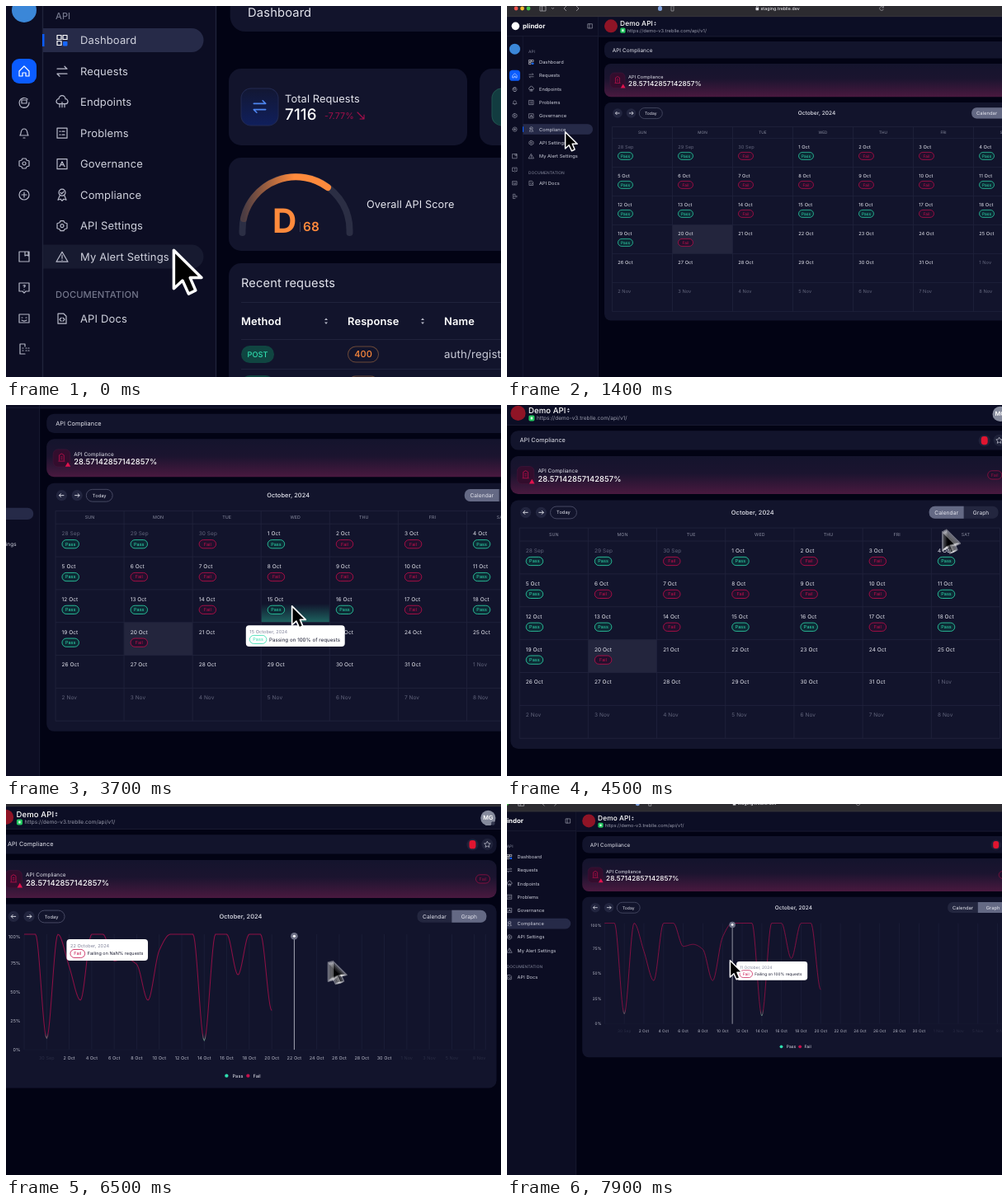
Recreate the animation shown at these times as an HTML page. Size 600 by 450 pixels, loop 8000 ms.

```html
<!DOCTYPE html>
<html lang="en">
<head>
<meta charset="utf-8">
<title>API compliance walkthrough</title>
<style>
  html, body { margin: 0; width: 100%; height: 100%; overflow: hidden; background: #020314; }
  svg { display: block; width: 600px; height: 450px; }
  text { font-family: Inter, Roboto, sans-serif; letter-spacing: .01em; white-space: pre; text-rendering: geometricPrecision; }
</style>
</head>
<body>
<svg id="stage" viewBox="0 0 600 450" xmlns="http://www.w3.org/2000/svg"></svg>
<script>
const LOOP = 8000, STEP = 100, LEAD = 110;
const PAGE_SWITCH = 900, GRAPH_OPEN = 4950, TOGGLE = 5150, CHART_HOVER = 6400;
const RED = '#c60f4c', TEAL = '#2fdcae', PANEL = '#12142c', LINE = '#20233c', TEXT = '#e4e5ee', DIM = '#62657c';
const clamp = (v, a = 0, b = 1) => Math.min(b, Math.max(a, v));
const range = n => [...Array(n).keys()];

// Monotone cubic through rows of [position, ...values]
function spline(rows) {
  const slope = (i, c) => (rows[i + 1][c] - rows[i][c]) / (rows[i + 1][0] - rows[i][0]);
  const tangent = (i, c) => {
    if (i === 0 || i === rows.length - 1) return 0;
    const a = slope(i - 1, c), b = slope(i, c);
    return a * b <= 0 ? 0 : 2 * a * b / (a + b);
  };
  return x => {
    let i = 0;
    while (i < rows.length - 2 && x >= rows[i + 1][0]) i++;
    const h = rows[i + 1][0] - rows[i][0], u = clamp((x - rows[i][0]) / h);
    return rows[i].slice(1).map((v, k) => {
      const c = k + 1, w = u * u * (3 - 2 * u);
      return v * (1 - w) + rows[i + 1][c] * w
        + h * u * (1 - u) * ((1 - u) * tangent(i, c) - u * tangent(i + 1, c));
    });
  };
}

// time, scale, x, y
const camera = spline([
  [0, 2.3, .3, -115], [300, 2.3, .3, -115], [900, 1.45, .1, -40], [1400, 1, 0, 0],
  [1600, .985, 0, 1], [2400, 1.122, -78.6, -35.1], [2700, 1.138, -85.1, -38.3],
  [3900, 1.138, -85.1, -38.3], [4750, 1.14, -142, -12.4], [5100, 1.14, -142, -12.4],
  [5350, 1.14, -143.6, -11.8], [7200, 1.14, -143.6, -11.8], [7900, .995, -26.2, -3.7], [8300, .963, 0, -1.9]
]);
// time, x, y
const pointer = spline([
  [0, 87.7, 178], [250, 87.7, 178], [700, 70, 152], [1700, 70, 152], [2400, 241, 215],
  [2600, 308, 213], [3050, 308, 213], [3500, 378.8, 247.2], [3900, 378.8, 247.2],
  [4700, 618.4, 129.3], [6200, 618.4, 129.3], [6500, 468, 178], [6800, 375, 194],
  [7200, 315, 195.5], [7900, 297.5, 193.7], [8300, 297.5, 193.7]
]);

// Markup helpers
const attrs = o => Object.entries(o).map(([k, v]) => `${k}="${v}"`).join(' ');
const text = (x, y, size, str, o = {}) =>
  `<text ${attrs({ x, y: y + size * .36, 'font-size': size, fill: TEXT, ...o })}>${str}</text>`;
const mid = (x, y, size, str, o = {}) => text(x, y, size, str, { 'text-anchor': 'middle', ...o });
const rect = (x, y, width, height, rx, fill, o = {}) => `<rect ${attrs({ x, y, width, height, rx, fill, ...o })}/>`;
const circle = (cx, cy, r, fill, o = {}) => `<circle ${attrs({ cx, cy, r, fill, ...o })}/>`;
const path = (d, stroke, width = 1, o = {}) =>
  `<path ${attrs({ d, stroke, 'stroke-width': width, fill: 'none', ...o })}/>`;
const icon = (x, y, d, stroke = '#c3c5d3', width = 1.2, scale = 1) => path(d, stroke, width,
  { transform: `translate(${x} ${y}) scale(${scale})`, 'stroke-linejoin': 'round', 'stroke-linecap': 'round' });
const group = (id, body, o = {}) => `<g ${attrs({ id, ...o })}>${body}</g>`;
const badge = (x, y, pass, w = 18, opacity = 1) => `<g opacity="${opacity}">`
  + rect(x, y, w, 9, 4.5, pass ? '#0d2a35' : '#22102d', { stroke: pass ? TEAL : RED, 'stroke-width': .7 })
  + mid(x + w / 2, y + 4.5, 4.8, pass ? 'Pass' : 'Fail', { fill: pass ? TEAL : RED }) + '</g>';

const ICON = {
  arrows: 'M-6-3H6l-3-3M6 3H-6l3 3',
  cloud: 'M-4 2a3 3 0 0 1 0-6a4 4 0 0 1 8 0a3 3 0 0 1 0 6zM-3 2v4M3 2v4M0 0v6',
  list: 'M-6-6H6V6H-6zM-3-2h1M0-2h3M-3 2h1M0 2h3',
  letter: 'M-6-6H6V6H-6zM-3 3L0-3L3 3M-2 1h4',
  medal: 'M-4-3a4 4 0 1 1 8 0a4 4 0 1 1-8 0M-3 1l-2 5l3-1l2 2l2-2l3 1l-2-5M-2-3l1.5 1.5L2-4',
  gear: 'M-2-6h4l1 2l3 1v6l-3 1l-1 2h-4l-1-2l-3-1v-6l3-1zM-2 0a2 2 0 1 1 4 0a2 2 0 1 1-4 0',
  alert: 'M0-6L7 6H-7zM0-2v4M0 4v.2',
  doc: 'M-5-6h7l3 3v9h-10zM-1-1l-2 2l2 2M1-1l2 2l-2 2',
  home: 'M-6 0L0-6L6 0V6H2V2H-2V6H-6z',
  orbit: 'M4-4a6 6 0 1 0 2 4M-3-3h6v4h-6zM-2 6h4',
  bell: 'M-5 3c2-2 0-8 5-8s3 6 5 8zM-1 6h2',
  plus: 'M-6 0a6 6 0 1 1 12 0a6 6 0 1 1-12 0M-3 0h6M0-3v6',
  book: 'M-6-6H6V6H-6zM1-6v5l2-1l2 1v-5',
  help: 'M-6-6H6V4H2L0 6L-2 4H-6zM-1-3q3-1 2 1l-1 1M0 2v.2',
  chat: 'M-6-5H6V5H-6zM-3-1h1M2-1h1M-3 2q3 2 6 0',
  exit: 'M1 6h-6v-12h6v3M2-1h1M5-1h1M2 2h1M5 2h1M-2 2h1M-2-1h1'
};
const CLOSEUP = { transform: 'translate(-.13 50) scale(.4348)' };

function sidebar() {
  const menu = ['Dashboard', 'Requests', 'Endpoints', 'Problems', 'Governance', 'Compliance', 'API Settings', 'My Alert Settings'];
  const kinds = ['', 'arrows', 'cloud', 'list', 'letter', 'medal', 'gear', 'alert'];
  const rail = [['orbit', 117], ['bell', 154], ['gear', 191], ['plus', 229], ['book', 304], ['help', 342], ['chat', 379], ['exit', 416]];
  const pill = 'M45 27H225a14.5 14.5 0 0 1 0 29H45z';
  return rect(-20, -85, 275, 1500, 0, '#0c0d23')
    + path('M254.5-85V1400M44.5-31V1400M0-31H254', '#20233a', 1.4)
    + circle(24, -59, 11, '#fff')
    + text(44, -59, 18, 'plindor', { 'font-weight': 700, fill: '#fff' })
    + icon(232, -59, 'M-6-6H6V6H-6zM-2-6V6')
    + circle(22, 5, 15, '#3b87d8')
    + rect(7, 64, 30, 30, 9, '#0b5cff') + icon(22, 79, ICON.home, '#fff')
    + rail.map(([k, y]) => icon(22, y, ICON[k], '#b4b6c6')).join('')
    + `<path id="hover" d="${pill}" fill="#171a30"/>`
    + group('active', `<path d="${pill}" fill="#262a48"/>` + rect(44, 34, 2.5, 15, 0, '#0b5cff'))
    + text(60, 12.5, 11, 'API', { fill: '#74778c', 'font-weight': 500 })
    + text(60, 350, 11.2, 'DOCUMENTATION', { fill: '#74778c', 'font-weight': 500 })
    + menu.map((name, i) => text(90, 41.7 + 37.5 * i, 13, name, { fill: '#d0d2de' })
      + (i ? icon(68, 41.7 + 37.5 * i, ICON[kinds[i]], '#b9bbca') : '')).join('')
    + icon(68, 41.5, 'M-6-6h5v5h-5zM1-6h5v5h-5zM-6 1h5v5h-5z', '#fff') + rect(69, 43, 5.5, 5.5, 1, '#1667ff')
    + text(90, 379.2, 13, 'API Docs', { fill: '#d0d2de' }) + icon(68, 379.2, ICON.doc, '#b9bbca');
}

function dashboard() {
  const arc = 'M286.5 275V272a65 65 0 0 1 130 0v3';
  const row = y => rect(285, y - 10.5, 40, 21, 10.5, '#104541') + mid(305, y, 9.2, 'POST', { fill: TEAL, 'font-weight': 500 })
    + rect(414.5, y - 9.5, 37, 19, 9.5, 'none', { stroke: '#6a4838' }) + mid(433, y, 11, '400', { fill: '#ff8a3c', 'font-weight': 500 })
    + text(531, y, 13.3, 'auth/register', { fill: '#c9cbd8' }) + path(`M285 ${y + 18}H1474`, LINE);
  return rect(270, 76, 289, 93, 15, PANEL) + rect(574, 76, 289, 93, 15, PANEL) + rect(878, 76, 289, 93, 15, PANEL)
    + rect(1182, 76, 306, 93, 15, PANEL) + rect(270, 184, 1218, 113, 15, PANEL) + rect(270, 312, 1218, 700, 15, PANEL)
    + rect(285, 100, 45, 45, 12, 'url(#blueTile)', { stroke: '#222a52' }) + icon(307.5, 122, ICON.arrows, '#4f86f0', 1.3, 1.2)
    + rect(589, 100, 45, 45, 12, '#123c40', { stroke: '#20534f' })
    + text(338, 112, 12.8, 'Total Requests') + text(338, 131, 18.7, '7116', { fill: '#fff', 'font-weight': 500 })
    + text(386, 133, 10.7, '-7.77%', { fill: '#a50f4b' }) + icon(430, 133, 'M-4-4L4 4M4-1V4H-1', '#a50f4b', 1.1)
    + path(arc, '#2b2e44', 8, { 'stroke-linecap': 'round' })
    + path('M288 258a65 65 0 0 1 102-38', 'url(#gauge)', 8, { 'stroke-linecap': 'round' })
    + text(323, 260, 40.5, 'D', { fill: '#ff8a3c', 'font-weight': 700 }) + path('M356.5 262v12', '#3c3f55')
    + text(360, 267.5, 15.3, '68', { fill: '#ff8a3c', 'font-weight': 600 })
    + text(437, 240, 12.7, 'Overall API Score') + text(285, 336, 14.6, 'Recent requests')
    + path('M285 359.5H1474M285 404.5H1474', LINE)
    + text(285, 382.5, 12.9, 'Method', { fill: '#fff', 'font-weight': 600 })
    + text(414, 382.5, 12.9, 'Response', { fill: '#fff', 'font-weight': 600 })
    + text(531, 382.5, 12.9, 'Name', { fill: '#fff', 'font-weight': 600 })
    + [388, 505].map(x => `<path d="M${x - 2} 381l2-2.5l2 2.5zM${x - 2} 383.5l2 2.5l2-2.5z" fill="#b5b7c6"/>`).join('')
    + range(14).map(i => row(422.5 + i * 36)).join('');
}

// Calendar: 28 Sep is day 0
const COL = 73, ROW = 35, GRID_X = 127.5, GRID_Y = 160.4;
const STATUS = 'PPFPFFP' + 'PFFFFFP' + 'PPFPPFP' + 'PF';
const dayNumber = i => i < 3 ? 28 + i : i < 34 ? i - 2 : i - 33;
const dayMonth = i => i < 3 ? 'Sep' : i < 34 ? 'Oct' : 'Nov';
const dayLabel = i => `${dayNumber(i)} ${dayMonth(i)}`;
const longDate = i => `${dayNumber(i)} ${{ Sep: 'September', Oct: 'October', Nov: 'November' }[dayMonth(i)]}, 2024`;
const cellX = i => GRID_X + i % 7 * COL, cellY = i => GRID_Y + Math.floor(i / 7) * ROW;

function calendar() {
  const bottom = GRID_Y + 6 * ROW, right = GRID_X + 7 * COL;
  const lines = range(8).map(i => `M${GRID_X + i * COL} 146.5V${bottom}`).join('')
    + `M${GRID_X} 146.5H${right}` + range(7).map(i => `M${GRID_X} ${GRID_Y + i * ROW}H${right}`).join('');
  const days = range(42).map(i => text(cellX(i) + 6.7, cellY(i) + 10.2, 5.7, dayLabel(i), { fill: dayMonth(i) === 'Oct' ? TEXT : DIM })
    + (STATUS[i] ? badge(cellX(i) + 7, cellY(i) + 17, STATUS[i] === 'P') : '')).join('');
  return rect(118, 117, 529.5, 264.5, 8, PANEL)
    + rect(cellX(22), cellY(22), COL, ROW, 0, '#23253d') + group('cellGlow', '')
    + path(lines, LINE, .8)
    + 'SUN MON TUE WED THU FRI SAT'.split(' ').map((d, i) => mid(GRID_X + (i + .5) * COL, 153.5, 4.7, d, { fill: '#8a8da0' })).join('')
    + days;
}

// Chart
const RATE = [100, 100, 10, 100, 72, 43, 100, 100, 77, 79, 74, 43, 86, 100, 100, 100, 8, 100, 100, 65, 100, 100, 34];
const dayX = i => 145.3 + 11.965 * i, rateY = v => 271.8 - 1.228 * v;

function chart() {
  const curve = spline(RATE.map((v, i) => [i, v]));
  const d = 'M' + range(22 * 12 + 1).map(k => `${dayX(k / 12).toFixed(2)} ${rateY(curve(k / 12)[0]).toFixed(2)}`).join('L');
  const ticks = range(20).map(k => 2 + 2 * k);
  const tickLabel = (i, anchor) => text(dayX(i), 280.2, 4.8, dayLabel(i),
    { 'text-anchor': anchor, fill: dayMonth(i) === 'Oct' ? '#b9bbc9' : '#2a2d45' });
  return rect(118, 117, 529.5, 195.5, 8, PANEL)
    + path([0, ...ticks, 41].map(i => `M${dayX(i)} 149V271.8`).join(''), '#1c1f39', .8)
    + path(`M${dayX(0)} 271.8H${dayX(41)}`, '#171a33', .6)
    + [[100, 151.5], [75, 179.7], [50, 210.4], [25, 241.1], [0, 271.8]].map(([v, y]) =>
      text(141.3, y, 4.8, v + '%', { 'text-anchor': 'end', fill: '#b9bbc9' })).join('')
    + ticks.slice(0, -1).map(i => tickLabel(i, 'middle')).join('') + tickLabel(41, 'end')
    + path(d, 'url(#rate)', .9, { id: 'curve', pathLength: 1 })
    + circle(360.5, 299.5, 1.9, TEAL) + text(366.7, 299.5, 5, 'Pass') + circle(383.3, 299.5, 1.9, RED) + text(388.6, 299.5, 5, 'Fail')
    + group('marker', path('M0 149V271.8', '#b4b5c1', .8) + circle(0, 150.9, 3.8, '#6d7086') + circle(0, 150.9, 1.4, '#fff'));
}

function compliance() {
  const arrow = (x, s) => circle(x, 130, 5.8, '#22253f') + path(`M${x - 2.6 * s} 130h${5.2 * s}m${-2 * s}-2l${2 * s} 2l${-2 * s} 2`, '#e4e5ee', .8);
  return rect(118, 70, 529.5, 40.3, 8, 'url(#alarm)')
    + rect(125, 81, 18, 18.5, 5, '#330d2d', { stroke: '#48163c', 'stroke-width': .5 })
    + path('M131.5 93v-6l2.5-1.5l2.5 1.5v6M130.5 93.5h7M133 89h2M133 91h2', RED, .7) + `<path d="M140.7 94.4l2.9 5h-5.8z" fill="#e0134e"/>`
    + text(147, 85.7, 5.6, 'API Compliance') + text(147, 94.2, 8.2, '28.57142857142857%', { fill: '#fff', 'font-weight': 500 })
    + badge(625.5, 85.6, false, 15, .7)
    + group('calendar', calendar()) + group('graph', chart())
    + arrow(134, -1) + arrow(150.5, 1)
    + rect(160.3, 123.6, 28, 13, 6.5, 'none', { stroke: '#4b4e68', 'stroke-width': .8 }) + mid(174.3, 130.1, 5, 'Today')
    + mid(375.5, 130.1, 6.5, 'October, 2024', { 'font-weight': 500 })
    + rect(563.2, 123.3, 73.6, 13.2, 6, '#23263f') + '<path id="choice" fill="#646984"/>'
    + mid(581.6, 130, 5.8, 'Calendar') + mid(618.4, 130, 5.8, 'Graph');
}

function chrome() {
  return rect(-50, -60, 800, 73, 0, '#2c2b30') + path('M-50 12.7H750', '#3d3c42', .6)
    + ['#f1554d', '#f5bd30', '#3fc648'].map((c, i) => circle(11 + 7.5 * i, 3, 2.4, c)).join('')
    + path('M40 0h7v6h-7zM42.5 0v6M54 2l1.5 1.5L57 2M72 0l-3 3l3 3M84 0l3 3l-3 3', '#a5a4aa', .8)
    + rect(183, 0, 5, 6, 2.5, '#7fa1dc') + path('M198 0h5M199 1v5h3v-5', '#a5a4aa', .7)
    + rect(301.5, 2, 3.6, 3.2, .6, '#dddde2') + path('M302.3 2v-1a1 1 0 0 1 2 0v1', '#dddde2', .6)
    + text(307.5, 3, 5.2, 'staging.treblle.dev', { fill: '#e6e6ea', 'font-weight': 500 })
    + path('M456 1.5a2.4 2.4 0 1 0 .4 2.2M456.4 0v2h-2', '#a5a4aa', .7);
}

function topBar() {
  return rect(111, 13, 640, 24, 0, '#0c0e25') + path('M111 37H750', '#20233a', .7)
    + circle(126, 24.3, 8, '#8f1426')
    + text(137, 21.2, 8.4, 'Demo API', { fill: '#fff', 'font-weight': 500 })
    + '<path d="M178.2 20.8l1.3-1.8l1.3 1.8zM178.2 22l1.3 1.8l1.3-1.8z" fill="#d0d2de"/>'
    + rect(137.3, 26.5, 6.2, 6.2, 1.5, '#22c55e') + rect(139.3, 28.3, 2.2, 2.6, .5, '#d8ffe4')
    + text(145.7, 29.6, 5.65, 'https://demo-v3.treblle.com/api/v1/', { fill: '#9b9dae' })
    + circle(638.6, 25.2, 8, '#858a9c') + mid(638.6, 25, 6.4, 'MG', { fill: '#fff', 'font-weight': 600 }) + circle(643.8, 31, 2, '#343850')
    + rect(118, 43, 529.5, 20.5, 8, PANEL)
    + circle(622, 53.6, 6.2, '#1f223a') + rect(618.5, 49, 7, 9, 3, '#e01530')
    + circle(637.7, 53.2, 6.2, '#1f223a') + path('M637.7 50l1 2.1l2.3.3l-1.7 1.6l.4 2.3l-2-1.1l-2 1.1l.4-2.3l-1.7-1.6l2.3-.3z', '#d0d2de', .6);
}

const gradient = (id, dir, stops) => `<linearGradient id="${id}" ${dir}>`
  + stops.map(([o, c, a = 1]) => `<stop offset="${o}" stop-color="${c}" stop-opacity="${a}"/>`).join('') + '</linearGradient>';
const DOWN = 'x1="0" y1="0" x2="0" y2="1"';
const CURSOR = '<path d="M.6 .8V21L5.2 16.8L8.4 23.8L12.1 22L9.2 15.3H15.2z" fill="#000" stroke="#fff" stroke-width="1.5" stroke-linejoin="round"/>';
const GHOSTS = range(4);

document.getElementById('stage').innerHTML = '<defs>'
  + gradient('alarm', DOWN, [[0, '#14142d'], [.45, '#1b142f'], [1, '#49193f']])
  + gradient('blueTile', DOWN, [[0, '#121733'], [1, '#101f5c']])
  + gradient('gauge', '', [[0, '#ff8a3c', .15], [.6, '#ff8a3c']])
  + gradient('failGlow', DOWN, [[0, RED, 0], [1, RED, .42]])
  + gradient('passGlow', DOWN, [[0, TEAL, 0], [1, TEAL, .4]])
  + gradient('rate', DOWN, [[0, '#8f0f46'], [.93, '#8a0f42'], [1, '#5f8f80']])
  + '</defs>' + rect(0, 0, 600, 450, 0, '#020314')
  + group('world', topBar()
    + group('dash', text(127.3, 53.4, 6.4, 'Dashboard') + group('cards', dashboard(), CLOSEUP))
    + group('comp', text(127.7, 53.2, 6.4, 'API Compliance') + compliance())
    + group('side', sidebar(), CLOSEUP) + chrome() + group('tip', '')
    + GHOSTS.map(i => group('cursor' + i, CURSOR)).join(''));

const el = id => document.getElementById(id);
const show = (id, on) => el(id).setAttribute('display', on ? 'inline' : 'none');
const move = (id, x, y, s = 1) => el(id).setAttribute('transform', `translate(${x} ${y}) scale(${s})`);

function tooltip(x, y, w, day, pass, message, size) {
  const bw = pass ? 18 : 15.5;
  el('tip').innerHTML = rect(x, y, w, 22.8, 3.5, '#fff')
    + text(x + 4, y + 6.8, 4.9, longDate(day), { fill: '#80839a' })
    + rect(x + 4, y + 10.8, bw, 8.8, 4.4, '#fff', { stroke: pass ? TEAL : RED, 'stroke-width': .7 })
    + mid(x + 4 + bw / 2, y + 15.2, 4.8, pass ? 'Pass' : 'Fail', { fill: pass ? TEAL : RED })
    + text(x + bw + 6.8, y + 15.2, size, message, { fill: '#16182e' });
}

function hoverCalendar(x, y) {
  const c = Math.floor((x - GRID_X) / COL), r = Math.floor((y - GRID_Y) / ROW), i = r * 7 + c;
  if (c < 0 || c > 6 || r < 0 || !STATUS[i]) return;
  const pass = STATUS[i] === 'P', w = pass ? 105.4 : 88.5;
  el('cellGlow').innerHTML = rect(cellX(i), cellY(i) + 15, COL, ROW - 15, 0, `url(#${pass ? 'pass' : 'fail'}Glow)`);
  tooltip(cellX(i) + COL / 2 - w / 2, cellY(i) + ROW + 3, w, i, pass,
    pass ? 'Passing on 100% of requests' : `Failing on ${RATE[i]}% requests`, 5.4);
}

function hoverChart(t, x, y) {
  const i = clamp(Math.round((x - dayX(0)) / 11.965), 0, 41), k = clamp((t - CHART_HOVER) / 400);
  move('marker', dayX(i), 0);
  tooltip(108 + (dayX(i) + 5 - 108) * k, 143 + (y + 2 - 143) * k, 86.5, i, false, `Failing on ${RATE[i] ?? NaN}% requests`, 4.75);
}

// A fast pointer smears into faint copies along its path
function drawPointer(t) {
  const [x, y] = pointer(t), [px, py] = pointer(Math.max(0, t - 16));
  const moving = Math.hypot(x - px, y - py) > 1;
  GHOSTS.forEach(i => {
    const [gx, gy] = pointer(Math.max(0, t - 4 * i));
    move('cursor' + i, gx, gy);
    el('cursor' + i).setAttribute('opacity', moving ? .4 : i ? 0 : 1);
  });
}

function draw(t) {
  const [s, cx, cy] = camera(t), [hx, hy] = pointer(t + LEAD);
  const onCompliance = t >= PAGE_SWITCH, onGraph = t >= GRAPH_OPEN;
  move('world', cx, cy, s);
  show('dash', !onCompliance);
  show('comp', onCompliance);
  show('calendar', !onGraph);
  show('graph', onGraph);
  show('marker', t >= CHART_HOVER);

  const item = Math.round((hy - 68) / 16.3);
  show('hover', hx < 104 && item >= 0 && item < 8);
  move('hover', 0, 37.5 * item);
  move('active', 0, onCompliance ? 37.5 * 5 : 0);

  el('choice').setAttribute('d', t < TOGGLE
    ? 'M600 123.3H569.2a6 6 0 0 0-6 6v1.2a6 6 0 0 0 6 6H600z'
    : 'M600 123.3h30.8a6 6 0 0 1 6 6v1.2a6 6 0 0 1-6 6H600z');
  const drawn = clamp((t - 5100) / 1350), eased = drawn * drawn * (3 - 2 * drawn);
  el('curve').setAttribute('stroke-dasharray', drawn < 1 ? `${eased} 2` : 'none');

  el('tip').innerHTML = el('cellGlow').innerHTML = '';
  if (t >= CHART_HOVER) hoverChart(t, hx, hy);
  else if (t >= 1700 && !onGraph) hoverCalendar(hx, hy);
  drawPointer(t);
}

const start = performance.now();
function tick() {
  const t = (performance.now() - start) % LOOP;
  draw(Math.floor(t / STEP) * STEP);
  requestAnimationFrame(tick);
}
tick();
</script>
</body>
</html>
```
